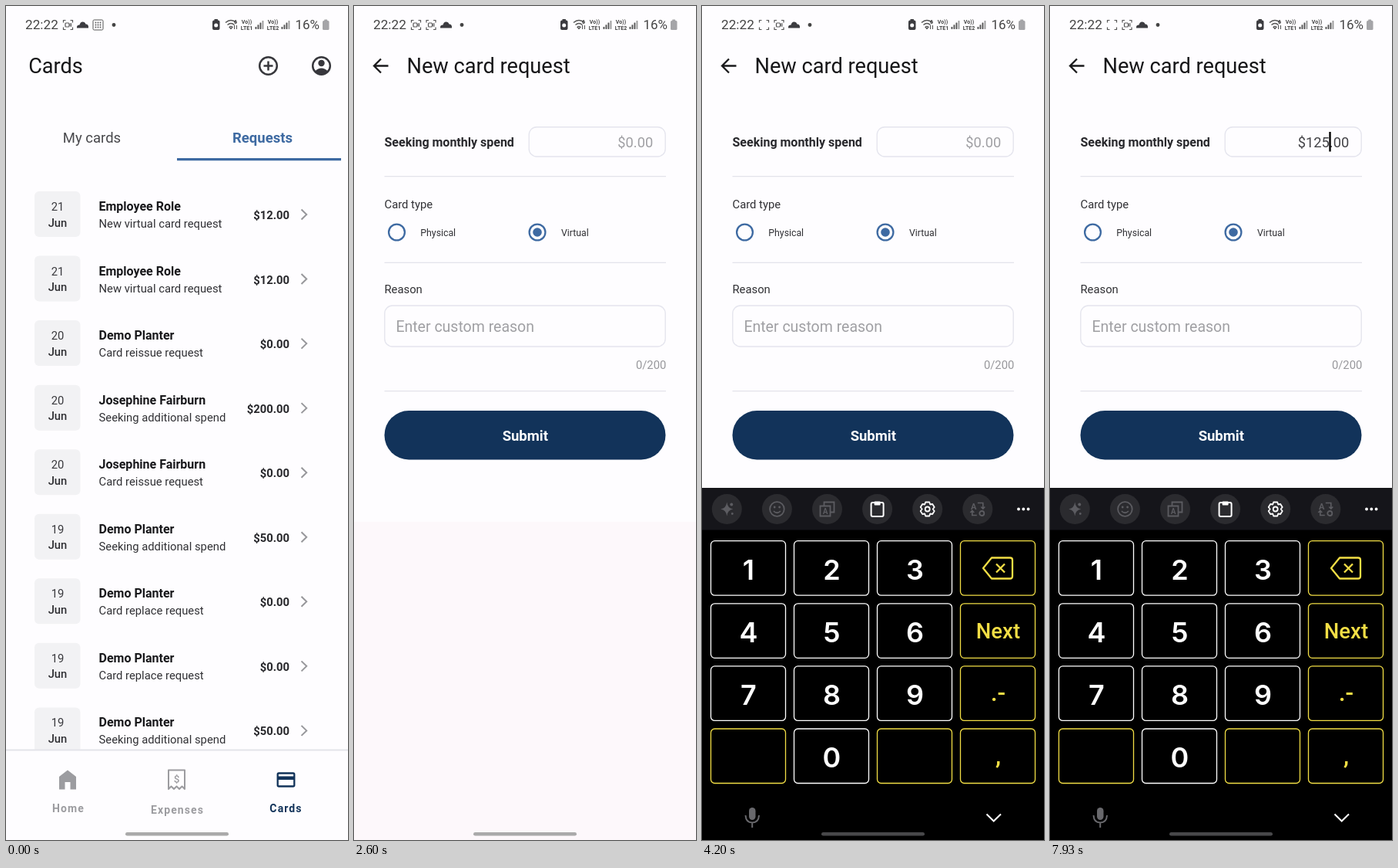
Recreate the animation shown at these times as an HTML page. Size 444x1080 px, loop 8000 ms.

```html
<!DOCTYPE html>
<html lang="en">
<head>
<meta charset="utf-8">
<title>New card request</title>
<style>
html, body { margin: 0; width: 100%; height: 100%; overflow: hidden; background: #fefdff; }
svg { display: block; width: 100%; height: 100%; font-family: Roboto, sans-serif; }
</style>
</head>
<body>
<svg id="stage" viewBox="0 0 444 1080"></svg>
<script>
const LOOP = 8000, STEP = 1000 / 15, ROW = 83.55;
const NAVY = '#12335a', BLUE = '#3e6aa2', YELLOW = '#f2de45';

// Markup helpers
const text = (x, y, size, str, fill = '#303034', more = '') =>
  `<text x="${x}" y="${y}" font-size="${size}" fill="${fill}" ${more}>${str}</text>`;
const line = (d, color, width = 2, more = '') =>
  `<path d="${d}" fill="none" stroke="${color}" stroke-width="${width}" ${more}/>`;
const rect = (x, y, w, h, r, fill, more = '') =>
  `<rect x="${x}" y="${y}" width="${w}" height="${h}" rx="${r}" fill="${fill}" ${more}/>`;
const circle = (x, y, r, fill, more = '') =>
  `<circle cx="${x}" cy="${y}" r="${r}" fill="${fill}" ${more}/>`;
const group = (id, body) => `<g id="${id}">${body}</g>`;
const at = (x, y, body) => `<g transform="translate(${x} ${y})">${body}</g>`;
const BOLD = 'font-weight="700"', MID = 'text-anchor="middle" ', END = 'text-anchor="end" ';
const ROUND = 'stroke-linecap="round" stroke-linejoin="round"';

// Status bar
const brackets = line('M-6-3V-6H-3M3-6H6V-3M6 3V6H3M-3 6H-6V3', '#555', 1.2);
const lens = rect(-3.5, -2.5, 5, 5, 1, 'none', 'stroke="#555" stroke-width="1.2"') +
  line('M1.5 0L4-2V2Z', '#555', 1);
const cloud = '<path d="M-7.5 4Q-8 0-4 0Q-3-4 0-4Q3-4 4-1Q8-1 7.5 4Z" fill="#3c3c40"/>';
const dots = [-3, 0, 3].map(y => [-3, 0, 3].map(x => circle(x, y, .9, '#555')).join('')).join('');
const lte = (x, n) => text(x, 23, 7, 'Vo))', '#444', MID + BOLD) + text(x, 30.5, 7, 'LTE' + n, '#444', MID + BOLD);
const bars = x => [0, 1, 2, 3].map(i =>
  rect(x + i * 3, 27 - i * 2.7, 1.9, 3 + i * 2.7, .4, i < 3 ? '#555' : '#999')).join('');
const status =
  text(25, 30, 17.2, '22:22', '#444') +
  at(80.5, 24.5, brackets + group('lens', lens)) +
  group('iconsA', at(99.5, 24.5, cloud) +
    at(119.5, 24.5, rect(-6.5, -6.5, 13, 13, 1.5, 'none', 'stroke="#555"') + dots)) +
  group('iconsB', at(100, 24.5, brackets + lens) + at(119.5, 24.5, cloud)) +
  circle(140, 24.5, 2.4, '#444') +
  rect(268, 18.5, 9.5, 12.5, 2, '#3c3c40') + rect(270.5, 17, 4.5, 2, .5, '#3c3c40') +
  circle(272.7, 25, 2.5, '#fefdff') +
  line('M285 21.5Q292 15.5 299 21.5M287.5 24.5Q292 20.5 296.5 24.5', '#555', 1.5) +
  line('M290 27.2Q292 25.5 294 27.2L292 29.5Z', '#555', 1.2) +
  text(296, 23, 7, '6', '#444', BOLD) + line('M296.5 25V30M299.5 25V30', '#555', 1) +
  lte(312.5, 1) + bars(323.5) + lte(346.5, 2) + bars(357.5) +
  text(375.5, 30, 17, '16%', '#444') +
  rect(411, 19, 8.5, 12, 1.5, '#a5a5a8') + rect(413.2, 17.5, 4, 2, .5, '#a5a5a8');

// Request list
const CARD = 'New virtual card request', SPEND = 'Seeking additional spend',
  REISSUE = 'Card reissue request', REPLACE = 'Card replace request';
const ROLE = 'Employee Role', DEMO = 'Demo Planter', JO = 'Josephine Fairburn';
const rows = [
  [21, ROLE, CARD, 12], [21, ROLE, CARD, 12], [20, DEMO, REISSUE, 0],
  [20, JO, SPEND, 200], [20, JO, REISSUE, 0], [19, DEMO, SPEND, 50],
  [19, DEMO, REPLACE, 0], [19, DEMO, REPLACE, 0], [19, DEMO, SPEND, 50],
].map(([day, name, what, sum], i) => at(0, i * ROW,
  rect(37, 240, 59.5, 59, 6, '#f2f2f4') +
  text(67, 265, 14.8, day, '#3a3a3e', MID) +
  text(67, 285.5, 14.8, 'Jun', '#303034', MID + 'font-weight="500"') +
  text(120.5, 265, 16, name, '#19191c', BOLD) +
  text(120.5, 287, 14.8, what) +
  text(368, 276, 14.8, '$' + sum.toFixed(2), '#28282c', END + BOLD) +
  line('M383.5 263.5L390.2 270L383.5 276.5', '#97979b', 2))).join('');

const label = (x, y, str, fill) => text(x, y, 14, str, fill, MID + BOLD + ' letter-spacing="1.1"');
const list =
  text(29.2, 87, 27.1, 'Cards', '#161618') +
  circle(340.5, 77.5, 24, '#000', 'id="halo" opacity=".025"') +
  circle(340.5, 77.5, 11.3, 'none', 'stroke="#37373c" stroke-width="2.5"') +
  line('M334.5 77.5H346.5M340.5 71.5V83.5', '#37373c', 2.5) +
  circle(409.5, 77.5, 11.3, 'none', 'stroke="#37373c" stroke-width="2.5"') +
  circle(409.5, 74, 4.2, '#37373c') +
  '<path d="M401 84.5Q409.5 76.5 418 84.5Q409.5 92.5 401 84.5Z" fill="#37373c"/>' +
  text(111.5, 177, 18.5, 'My cards', '#48484c', MID) +
  text(333, 177, 18.5, 'Requests', BLUE, MID + BOLD) +
  rect(222, 197, 213, 3.2, 0, BLUE) +
  rows +
  rect(0, 963, 444, 117, 0, '#fefdff') + rect(0, 962.5, 444, 2, 0, '#e4e4ea') +
  '<path d="M69 998L80 989.5L91 998V1014.5H83.5V1005H76.5V1014.5H69Z" fill="#9c9ca0"/>' +
  line('M211 989.5H232V1014L228.5 1010.5L225 1014L221.5 1010.5L218 1014L214.5 1010.5L211 1014Z', '#9c9ca0', 2, ROUND) +
  text(221.5, 1005.5, 13.5, '$', '#9c9ca0', MID + 'font-weight="500"') +
  rect(352.7, 993.5, 21.6, 17, 1.5, 'none', `stroke="${NAVY}" stroke-width="2.3"`) +
  rect(352, 997.5, 23, 4.5, 0, NAVY) +
  label(81, 1043.5, 'Home', '#9c9ca0') + label(222.5, 1045.5, 'Expenses', '#9c9ca0') +
  label(363.5, 1043.5, 'Cards', NAVY);

// Request form
const rule = y => rect(39.5, y, 365.5, 1.3, 0, '#e3e3eb');
const field = (x, y, w, h) => rect(x, y, w, h, 10, '#fefdff', 'stroke="#e5e5ee" stroke-width="1.4"');
const radio = x => circle(x, 293, 10.4, 'none', `stroke="${BLUE}" stroke-width="2.3"`);
const form =
  rect(0, 0, 444, 1080, 0, '#fefdff') +
  rect(0, 668, 444, 456, 0, '#fdf8fb', 'id="under"') +
  line('M44.5 77.5H26.5M35 68.5L26 77.5L35 86.5', '#1a1a1c', 2.3) +
  text(68.5, 87, 27.2, 'New card request', '#161618') +
  text(39.5, 181.5, 16, 'Seeking monthly spend', '#28282c', BOLD) +
  field(227.2, 156.7, 177, 38.3) +
  text(388.2, 183, 18.3, '', '', END + 'id="value"') +
  rect(0, 163, 2.4, 25.5, 0, '#000', 'id="cursor"') +
  rule(220) + text(39.5, 262, 14.8, 'Card type') +
  radio(55.5) + radio(238) + circle(238, 293, 5.8, BLUE) +
  text(86.3, 298, 12.3, 'Physical') + text(269, 298, 12.3, 'Virtual') +
  rule(331.7) + text(39.5, 371.5, 14.8, 'Reason') +
  field(39.8, 388, 364.4, 53) +
  text(54.4, 422, 19.5, 'Enter custom reason', '#a0a0a4') +
  text(405.3, 469.5, 14.8, '0/200', '#98989c', END) +
  rule(498) + rect(39.5, 524, 365, 63.5, 31.7, NAVY) +
  text(222.3, 563, 18.5, 'Submit', '#fff', MID + BOLD);

// Keyboard
const DIM = '#5c5c61';
const tools = [
  `<path d="M0-9Q1-1 8 0Q1 1 0 9Q-1 1-8 0Q-1-1 0-9Z" fill="${DIM}"/>` + circle(6, -6, 2, DIM) + circle(7, 6, 1.4, DIM),
  circle(0, 0, 9.3, 'none', `stroke="${DIM}" stroke-width="1.8"`) + circle(-3.2, -2.5, 1.4, DIM) +
    circle(3.2, -2.5, 1.4, DIM) + line('M-4.5 2.5Q0 7 4.5 2.5', DIM, 1.7),
  line('M-4-4V-9H9V4H4M-9-4H4V9H-9Z', DIM, 1.8) + text(-2.5, 6.5, 10, 'A', DIM, MID + BOLD),
  rect(-8, -8.5, 16, 18, 2, 'none', 'stroke="#fff" stroke-width="2"') + rect(-4, -10, 8, 5, 1, '#fff'),
  line('M-2.5-9H2.5L3.5-6L6.5-6.5L9-2.5L7 0L9 2.5L6.5 6.5L3.5 6L2.5 9H-2.5L-3.5 6L-6.5 6.5L-9 2.5L-7 0L-9-2.5L-6.5-6.5L-3.5-6Z', '#fff', 1.8, ROUND) +
    circle(0, 0, 3, 'none', 'stroke="#fff" stroke-width="1.8"'),
  text(-5, 0, 11, 'A', DIM, MID + BOLD) + circle(5.5, 5.5, 3, 'none', `stroke="${DIM}" stroke-width="1.8"`) +
    line('M0-8H7V-1M4.5-3L7-.5L9.5-3M-1 8H-7V2M-9.5 4.5L-7 2L-4.5 4.5', DIM, 1.6),
].map((icon, i) => at(32.3 + i * 65.1, 651.5, circle(0, 0, 19.5, '#2b2b2f') + icon)).join('');

const keyX = c => 11.5 + c * 108, keyY = r => 692.7 + r * 81.1;
const keys = ['1', '2', '3', '', '4', '5', '6', 'Next', '7', '8', '9', '.-', '', '0', '', ','].map((k, i) => {
  const x = keyX(i % 4), y = keyY(i >> 2), digit = /\d/.test(k);
  const color = digit ? '#fff' : YELLOW;
  const style = MID + (digit ? 'font-weight="600" font-family="Inter, sans-serif"' : 'font-weight="500"');
  const size = digit ? 36 : k === 'Next' ? 27.5 : 32;
  return rect(x, y, 97, 70.5, 5, '#000', `stroke="${color}" stroke-width="1.3"`) +
    (digit ? rect(x, y, 97, 70.5, 5, '#858587', `id="press${k}" visibility="hidden"`) : '') +
    text(x + 48.9, y + (digit ? 50 : 45.5), size, k, color, style);
}).join('');

const keyboard =
  rect(0, 624, 444, 500, 0, '#000') + rect(0, 624, 444, 54.5, 0, '#15151a') + tools +
  [411, 417.3, 423.6].map(x => circle(x, 651.5, 1.9, '#fff')).join('') + keys +
  line('M376 714.5H400Q403 714.5 403 717.5V738.5Q403 741.5 400 741.5H376L365 728Z', YELLOW, 2.3, ROUND) +
  line('M382 722.5L393 733.5M393 722.5L382 733.5', YELLOW, 2.3) +
  circle(0, 0, 11, '#bcd3ee', 'id="touch" opacity=".75" stroke="#8faed2"');

const navKeys =
  rect(61, 1038, 8.5, 16, 4.2, '#68686c') +
  line('M56.5 1048Q57 1057.5 65.2 1057.5Q73.5 1057.5 74 1048M65.2 1057.5V1064', '#68686c', 2) +
  line('M369.5 1046.5L378.7 1055.5L388 1046.5', '#fff', 2, 'id="hide"');

document.getElementById('stage').innerHTML =
  rect(0, 0, 444, 1080, 0, '#fefdff') + group('list', list) + group('form', form) +
  group('keyboard', keyboard) + group('navKeys', navKeys) + status +
  rect(155, 1070, 134, 4.6, 2.3, '#aaa', 'id="handle"');

const el = id => document.getElementById(id);
const set = (id, name, value) => el(id).setAttribute(name, value);
const show = (id, on) => set(id, 'visibility', on ? 'visible' : 'hidden');
const ramp = (t, from, to) => Math.min(1, Math.max(0, (t - from) / (to - from)));

const FOCUS = 3480, RISE = 3488;
const taps = [ // key, time of release, touch point
  ['1', 4930, 60, 724], ['2', 5470, 166, 723], ['5', 7450, 168, 804],
];

function draw(t) {
  const fade = ramp(t, 1700, 1900);
  show('iconsA', t < 700);
  show('iconsB', t >= 700);
  show('lens', t < 4000);
  show('halo', t >= 1600);
  set('form', 'opacity', fade);

  // Typing: the cursor restarts its blink at each key
  const typed = taps.filter(tap => t >= tap[1]);
  const digits = typed.map(tap => tap[0]).join('');
  const since = t - (typed.length ? typed[typed.length - 1][1] : FOCUS);
  el('value').textContent = `$${digits || 0}.00`;
  set('value', 'fill', digits ? '#444448' : '#a0a0a4');
  set('cursor', 'x', digits ? 362.3 : 384.9);
  show('cursor', since >= 0 && Math.floor(since / 500) % 2 === 0);

  const down = taps.find(tap => t >= tap[1] - 110 && t < tap[1]);
  for (const tap of taps) show('press' + tap[0], tap === down);
  show('touch', down);
  if (down) set('touch', 'transform', `translate(${down[2]} ${down[3]})`);

  // Keyboard slide
  const slide = ramp(t, RISE, RISE + 320), open = t > RISE;
  set('keyboard', 'transform', `translate(0 ${456 * (1 - slide) ** 3})`);
  show('keyboard', open);
  show('navKeys', open);
  set('hide', 'opacity', .1 + .9 * slide ** 1.8);
  show('under', t > 2000);
  set('under', 'y', open ? 624 : 668);
  set('under', 'fill', open ? '#f9f9fc' : '#fdf8fb');
  set('handle', 'fill', slide > .2 ? '#48484a' : '#aaa');
}

function frame(now) {
  draw(Math.floor((now % LOOP + 4) / STEP) * STEP);
  requestAnimationFrame(frame);
}
draw(0);
requestAnimationFrame(frame);
</script>
</body>
</html>
```
